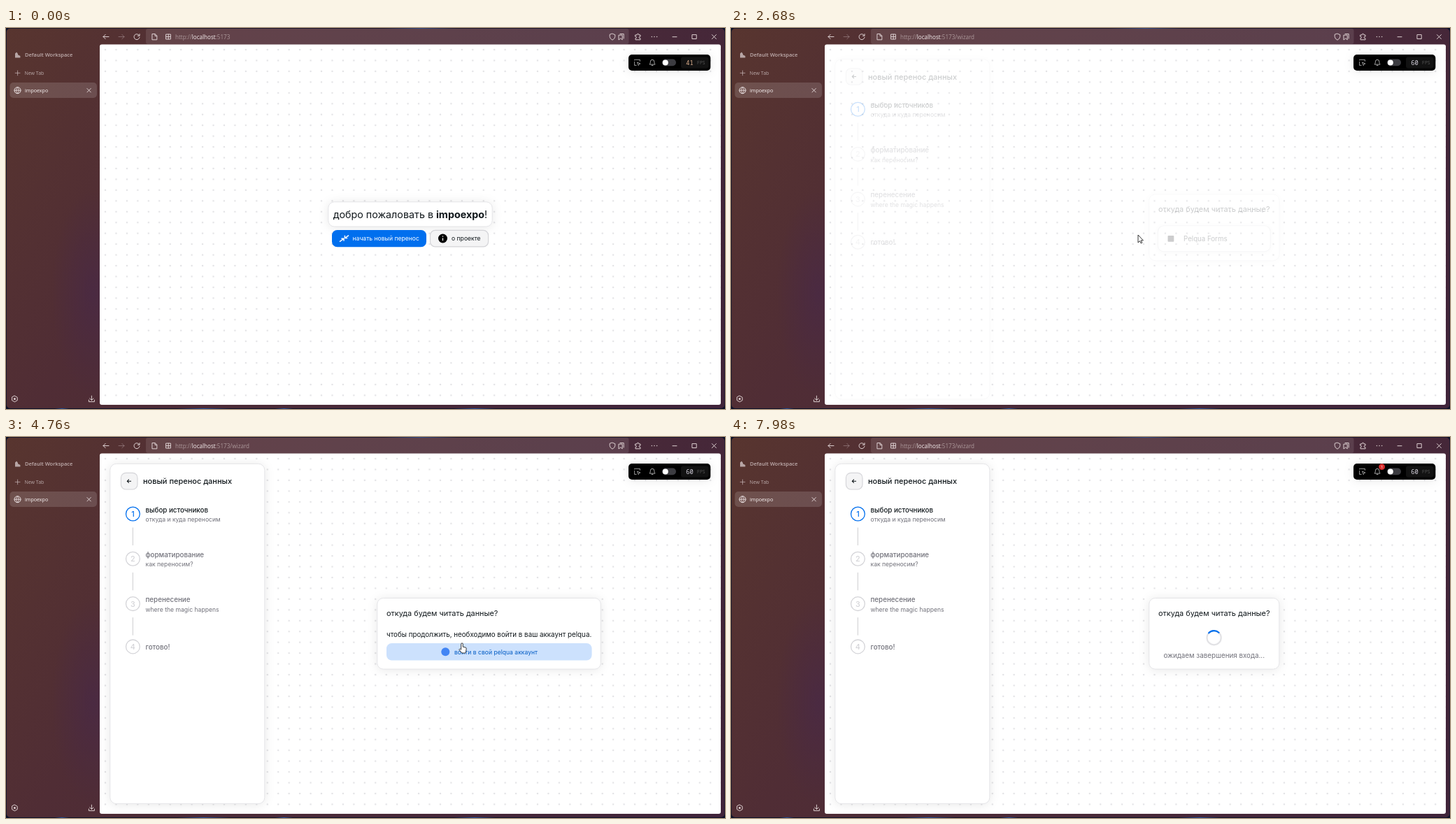
An HTML page for the animation above (8000 ms loop, 1028 px wide and 545 px high).

```html
<!DOCTYPE html>
<html lang="ru">
<head>
<meta charset="utf-8">
<title>impoexpo</title>
<style>
html, body { margin: 0; width: 100%; height: 100%; overflow: hidden; background: #0a0f26; }
svg { display: block; width: 1028px; height: 545px; font-family: Inter, sans-serif; }
.ui { font-family: "Open Sans", sans-serif; }
.mono { font-family: "Noto Sans Mono", monospace; }
.line { fill: none; stroke: #dccfd0; stroke-width: 1; stroke-linecap: round; stroke-linejoin: round; }
.dim { opacity: .4; }
.card { filter: drop-shadow(0 1px 7px rgba(0, 0, 0, .09)); }
.soft { filter: drop-shadow(0 1px 2px rgba(0, 0, 0, .07)); }
</style>
</head>
<body>
<svg id="stage" viewBox="0 0 1028 545" xmlns="http://www.w3.org/2000/svg"></svg>
<script>
const LOOP = 8000;
const INK = '#11181c', GREY = '#71717a', PALE = '#d4d4d8', BLUE = '#006fee';

// markup helpers
const text = (x, y, size, str, fill = INK, extra = '') =>
  `<text x="${x}" y="${y}" font-size="${size}" fill="${fill}" ${extra}>${str}</text>`;
const rect = (x, y, x2, y2, r, fill, extra = '') =>
  `<rect x="${x}" y="${y}" width="${x2 - x}" height="${y2 - y}" rx="${r}" fill="${fill}" ${extra}/>`;
const circle = (x, y, r, fill, extra = '') =>
  `<circle cx="${x}" cy="${y}" r="${r}" fill="${fill}" ${extra}/>`;
const line = (d, extra = '') => `<path class="line" d="${d}" ${extra}/>`;
const group = (id, body, extra = '') => `<g id="${id}" ${extra}>${body}</g>`;
const card = (x, y, x2, y2, r = 8.5) => rect(x, y, x2, y2, r, '#fff', 'class="card" stroke="#e4e4e7"');
const MID = 'text-anchor="middle"', MEDIUM = 'font-weight="500"';

const defs = `<defs>
  <linearGradient id="chrome" x1="0" y1="0" x2="1028" y2="545" gradientUnits="userSpaceOnUse">
    <stop offset="0" stop-color="#58352f"/><stop offset=".25" stop-color="#502d35"/>
    <stop offset=".6" stop-color="#4a2a38"/><stop offset="1" stop-color="#40243a"/>
  </linearGradient>
  <linearGradient id="glow"><stop offset="0" stop-color="#0a0f26"/>
    <stop offset=".5" stop-color="#1d4f9c"/><stop offset="1" stop-color="#0a0f26"/></linearGradient>
  <radialGradient id="violet"><stop offset="0" stop-color="#47284a" stop-opacity=".6"/>
    <stop offset="1" stop-color="#47284a" stop-opacity="0"/></radialGradient>
  <pattern id="dots" x="134.3" y="23.3" width="15.45" height="15.45" patternUnits="userSpaceOnUse">
    ${circle(7.72, 7.72, 1.25, '#e2e2e5')}
  </pattern>
  <clipPath id="page">${rect(134, 23.5, 1022, 539, 3, '#fff')}</clipPath>
</defs>`;

const toolbar = rect(200, 1, 890.5, 23, 3, '#fff', 'opacity=".1"')
  + line('M147 12.5H139M142.2 9.3L139 12.5L142.2 15.7')
  + line('M161 12.5H169M165.8 9.3L169 12.5L165.8 15.7', 'style="opacity:.35"')
  + line('M190.6 10.8A4 4 0 1 0 191 13.3M191 8.6V11.2H188.3')
  + line('M209.3 8.5H213.2L215.8 11.2V16.8H209.3ZM213 8.7V11.4H215.6')
  + line('M229 9H235.4V16H229ZM229 12.5H235.4M232.2 9V16')
  + line('M867 8.2L870.8 9.6V12.4Q870.6 15.4 867 17.2Q863.4 15.4 863.2 12.4V9.6Z')
  + line('M876.3 10.2H881.2V16.8L878.8 14.8L876.3 16.8ZM878 8.5H883.2V15')
  + line('M900 10H902.2Q902 8.2 903.5 8.2T904.8 10H907V12.2Q905 12.2 905 13.5T907 14.8V16.8H900V14.6Q901.6 14.6 901.6 13.4T900 12.2Z')
  + [923.4, 927, 930.6].map(x => circle(x, 12.5, .75, '#dccfd0')).join('')
  + line('M953 12.7H959M981.3 9.6H987.2V15.5H981.3ZM1009.4 9.6L1015.4 15.6M1015.4 9.6L1009.4 15.6')
  + `<text class="ui" x="242" y="15.6" font-size="8.1" fill="#ab9799">http://<tspan fill="#f5eeee">localhost</tspan>:5173<tspan id="route"></tspan></text>`;

const sidebar = '<g class="ui">'
  + '<path d="M13 42.5V36.5L15.2 34.6L17 37V38.2L20.4 40V42.5Z" fill="#b7a5a5"/>'
  + text(27, 41.4, 7.5, 'Default Workspace', '#c0aeae', 'font-weight="600"')
  + line('M13.2 64.4H20M16.6 61V67.8', 'opacity=".6"')
  + text(26.5, 67, 7, 'New Tab', '#b9a8a8')
  + rect(5.5, 78, 130, 100, 5, '#fff', 'opacity=".14"')
  + circle(16.5, 89.2, 4.5, 'none', 'stroke="#f2eaea"')
  + line('M12 89.2H21M16.5 84.7Q12.8 89.2 16.5 93.7Q20.2 89.2 16.5 84.7')
  + text(27, 91.8, 7.1, 'impoexpo', '#fbf6f6')
  + line('M115.9 86.5L121.3 91.9M121.3 86.5L115.9 91.9')
  + line('M12.4 526.2L16.2 528.3V532.7L12.4 534.8L8.6 532.7V528.3Z')
  + circle(12.4, 530.5, 1.5, '#dccfd0')
  + line('M122.4 526.2V532.4M119.7 529.9L122.4 532.5L125.1 529.9M118.4 532V534.6H126.4V532')
  + '</g>';

const monitor = '<g>'
  + rect(890, 38, 1007.3, 61, 5, '#000', 'class="card"')
  + line('M898.6 46V45.4H906.4V48M898.6 48.5V53.4H901.2M902.6 49.2L907 51L905 51.8L904.2 53.6Z', 'style="stroke:#aaa;stroke-width:.9" stroke-dasharray="2 .8"')
  + line('M920.4 51.8Q921.4 50.6 921.4 48.2A2.6 2.8 0 0 1 926.8 48.2Q926.8 50.6 927.8 51.8ZM923.2 53.5H925', 'style="stroke:#b5b5b5;stroke-width:.9"')
  + rect(938, 44.6, 958, 54.2, 4.8, '#3c3c41') + circle(942.8, 49.4, 4, '#fff')
  + rect(965, 41.5, 1004.5, 57.5, 3, '#121212')
  + text(972.3, 52.6, 8.8, '', '#ddd', 'id="fps" class="mono" font-weight="500"')
  + text(988, 51.8, 6.5, 'FPS', '#555', 'class="mono"')
  + group('badge', circle(930.6, 42.7, 4.4, '#d92d2d') + text(930.6, 44.6, 5.2, '1', '#fff', MID))
  + '</g>';

const home = card(460.8, 248.8, 695.2, 284)
  + text(578, 272, 14.3, 'добро пожаловать в <tspan font-weight="700">impoexpo</tspan>!', INK, MID)
  + group('start', rect(466, 289, 601, 313.3, 7.5, BLUE, 'id="startBg"')
    + '<path d="M477 305.6L482.6 301.6M479.4 301.2H483V304.8M490 296.6L484.8 300.4M484.4 296.8V300.6H488.2" fill="none" stroke="#fff" stroke-width="1.4" stroke-linejoin="round"/>'
    + text(495.5, 304.4, 8.6, 'начать новый перенос', '#fff'))
  + rect(606.5, 289.4, 689.6, 312.9, 7.2, '#f4f4f5', `stroke="${PALE}" stroke-width="1.2"`)
  + circle(624.5, 301, 6.5, '#000')
  + rect(623.9, 300.2, 625.1, 304.3, .5, '#fff') + circle(624.5, 298, .8, '#fff')
  + text(637, 304.4, 8.6, 'о проекте');

const steps = [
  [110, 'выбор источников', 'откуда и куда переносим'],
  [174.3, 'форматирование', 'как переносим?'],
  [238.6, 'перенесение', 'where the magic happens'],
  [299.9, 'готово!', '']
].map(([y, name, note], i) => {
  const on = i === 0, last = i === 3;
  return circle(181.4, y, 9.9, '#fff', `stroke="${on ? BLUE : PALE}" stroke-width="1.3"`)
    + text(181.4, y + 3.9, 10.8, i + 1, on ? BLUE : PALE, MID + ' ' + MEDIUM)
    + text(199.5, y + (last ? 3.6 : -2.4), 9.8, name, on ? INK : GREY, MEDIUM)
    + text(199.5, y + 11.1, 8.6, note, GREY)
    + (last ? '' : rect(180.8, y + 19.5, 182, y + 45, 0, PALE));
}).join('');

const panel = card(148.8, 38.3, 369.8, 524.6, 9)
  + rect(164.4, 51.4, 188, 75, 7, '#f4f4f5', `stroke="${PALE}" stroke-width="1.1"`)
  + `<path d="M179 63.2H173.4M175.8 60.7L173.3 63.2L175.8 65.7" fill="none" stroke="${INK}" stroke-width="1.1"/>`
  + text(196, 67.4, 11, 'новый перенос данных', INK, MEDIUM) + steps;

const ASK = 'откуда будем читать данные?';
const pick = card(597.8, 234, 783.8, 328.8)
  + text(690.8, 259.5, 10.9, ASK, INK, MID)
  + group('option', rect(610.4, 278.8, 771.2, 316, 8.5, '#fff', 'class="soft" stroke="#dedee2" stroke-width="1.2"')
    + rect(624.5, 293, 633.3, 301.8, 1, '#18181b')
    + text(647, 301, 9.7, 'Pelqua Forms'));

const login = card(530.8, 230.5, 850.3, 332)
  + group('loginBody', text(544, 255.9, 10.9, ASK)
    + text(544, 286.2, 9.8, 'чтобы продолжить, необходимо войти в ваш аккаунт pelqua.')
    + rect(544, 295, 837.6, 319.4, 7.5, '#cce1fd')
    + circle(628.3, 307.2, 6, '#4285f4')
    + text(641, 310.5, 8.6, 'войти в свой pelqua аккаунт', '#005bc4'));

const wait = card(597.8, 230.5, 783.8, 332)
  + text(690.8, 255.9, 10.9, ASK, INK, MID)
  + circle(690.6, 287.2, 10.1, 'none', 'stroke="#e2e2e5" stroke-width="2.2"')
  + circle(690.6, 287.2, 10.1, 'none', `id="arc" stroke="${BLUE}" stroke-width="2.2" stroke-linecap="round"`)
  + text(690.7, 315.8, 9.8, 'ожидаем завершения входа...', GREY, MID);

const EDGE = 'fill="#fff" stroke="#222" stroke-width=".9" stroke-linejoin="round"';
const cursor = `<path id="arrow" d="M0 0V11L2.5 8.6L4.2 12L5.8 11.2L4.2 7.9H7.4Z" ${EDGE}/>`
  + `<path id="hand" d="M-1.3 8.6V1.2A1.3 1.3 0 0 1 1.3 1.2V5.2L5 6Q6.3 6.4 6.2 7.8L5.6 11.8Q5.4 13 4.8 14H.1L-3.8 9.8Q-4.4 8.6 -3.3 8.1Q-2.3 7.9 -1.3 9.2Z" ${EDGE}/>`;

const stage = document.getElementById('stage');
stage.innerHTML = defs
  + rect(0, 0, 1028, 545, 0, '#0a0f26')
  + rect(540, 0, 645, 1, 0, 'url(#glow)')
  + [[70, 90], [245, 320], [385, 410], [640, 700]].map(([a, b]) => rect(a, 544, b, 545, 0, 'url(#glow)')).join('')
  + rect(.8, .8, 1027.4, 544, 5, 'url(#chrome)')
  + '<ellipse cx="125" cy="380" rx="60" ry="150" fill="url(#violet)"/>'
  + toolbar + sidebar
  + rect(134, 23.5, 1022, 539, 3, '#fff')
  + '<g clip-path="url(#page)">' + rect(134, 23.5, 1022, 539, 0, 'url(#dots)')
  + group('home', home)
  + group('panel', panel) + group('pick', pick) + group('login', login) + group('wait', wait)
  + '</g>' + monitor + group('cursor', cursor);

const el = {};
stage.querySelectorAll('[id]').forEach(n => el[n.id] = n);

// timing helpers
const clamp = v => Math.min(1, Math.max(0, v));
const span = (t, a, b) => clamp((t - a) / (b - a));
const easeOut = p => 1 - (1 - p) ** 2;
const smooth = p => p * p * (3 - 2 * p);
const mix = (a, b, p) => a + (b - a) * p;
const show = (node, on) => node.setAttribute('visibility', on ? 'inherit' : 'hidden');
const fade = (node, v) => node.setAttribute('opacity', v);
const press = (node, cx, cy, s) =>
  node.setAttribute('transform', `translate(${cx} ${cy}) scale(${s}) translate(${-cx} ${-cy})`);

// cubic-bezier(.25, .1, .25, 1)
function ease(x) {
  let lo = 0, hi = 1, s = .5;
  for (let i = 0; i < 20; i++) {
    s = (lo + hi) / 2;
    if (.75 * s * (1 - s) + s ** 3 < x) lo = s; else hi = s;
  }
  return .3 * s * (1 - s) ** 2 + 3 * s * s * (1 - s) + s ** 3;
}

// pointer moves: start, end, from, control, to
const moves = [
  [1080, 1880, [990, 464], [730, 326], [582, 296]],
  [3370, 3770, [582, 296], [618, 330], [652, 295]],
  [5220, 5500, [652, 295], [652, 302], [655, 305.5]],
  [6170, 6900, [655, 305.5], [800, 360], [1030, 400]]
];
function pointer(t) {
  const m = moves.filter(v => t >= v[0]).pop() || moves[0];
  const p = smooth(span(t, m[0], m[1])), q = 1 - p;
  return [0, 1].map(i => q * q * m[2][i] + 2 * p * q * m[3][i] + p * p * m[4][i]);
}

const rates = [[0, 41], [70, 46], [150, 50], [230, 54], [310, 57], [400, 59], [480, 60], [7240, 59], [7700, 60]];

function draw(t) {
  const wizard = t >= 2620;
  el.route.textContent = t >= 2550 ? '/wizard' : '';

  show(el.home, !wizard);
  fade(el.home, 1 - span(t, 2550, 2640));
  const hover = span(t, 1740, 2000);
  el.startBg.setAttribute('fill', `rgb(${mix(0, 51, hover)},${mix(111, 140, hover)},${mix(238, 241, hover)})`);
  press(el.start, 533.5, 301, 1 - .03 * span(t, 2470, 2540));

  const enter = easeOut(span(t, 2620, 3160));
  show(el.panel, wizard);
  fade(el.panel, enter);
  el.panel.setAttribute('transform', `translate(0 ${8 * (1 - enter)})`);

  show(el.pick, wizard && t < 4500);
  fade(el.pick, enter);
  el.pick.setAttribute('transform', `translate(0 ${5 * (1 - enter)})`);
  press(el.option, 690.8, 297.4, 1 - .03 * span(t, 4420, 4490));

  show(el.login, t >= 4500 && t < 5970);
  fade(el.loginBody, easeOut(span(t, 4440, 4760)));

  show(el.wait, t >= 5970);
  show(el.arc, t >= 6170);
  const quarter = 2 * Math.PI * 10.1 / 4;
  el.arc.setAttribute('stroke-dasharray', `${quarter * span(t, 6000, 6470)} 100`);
  const turn = ease(((t - 5920 + LOOP) % 800) / 800) * 360 - 90;
  el.arc.setAttribute('transform', `rotate(${turn} 690.6 287.2)`);

  const rate = rates.filter(r => t >= r[0]).pop()[1];
  el.fps.textContent = rate;
  el.fps.setAttribute('fill', rate < 50 ? '#dcae8c' : '#dcd8e4');
  show(el.badge, t >= 6440);

  const [x, y] = pointer(t);
  const onHome = !wizard && y > 289 && y < 313 && x > 466 && x < 690;
  const onCard = wizard && t < 6170 && x > 610 && y < 316;
  show(el.cursor, t >= 1080 && t < 6900);
  show(el.hand, onHome || onCard);
  show(el.arrow, !(onHome || onCard));
  el.cursor.setAttribute('transform', `translate(${x} ${y})`);
}

const begin = performance.now();
function tick() {
  draw((performance.now() - begin) % LOOP);
  requestAnimationFrame(tick);
}
tick();
</script>
</body>
</html>
```
